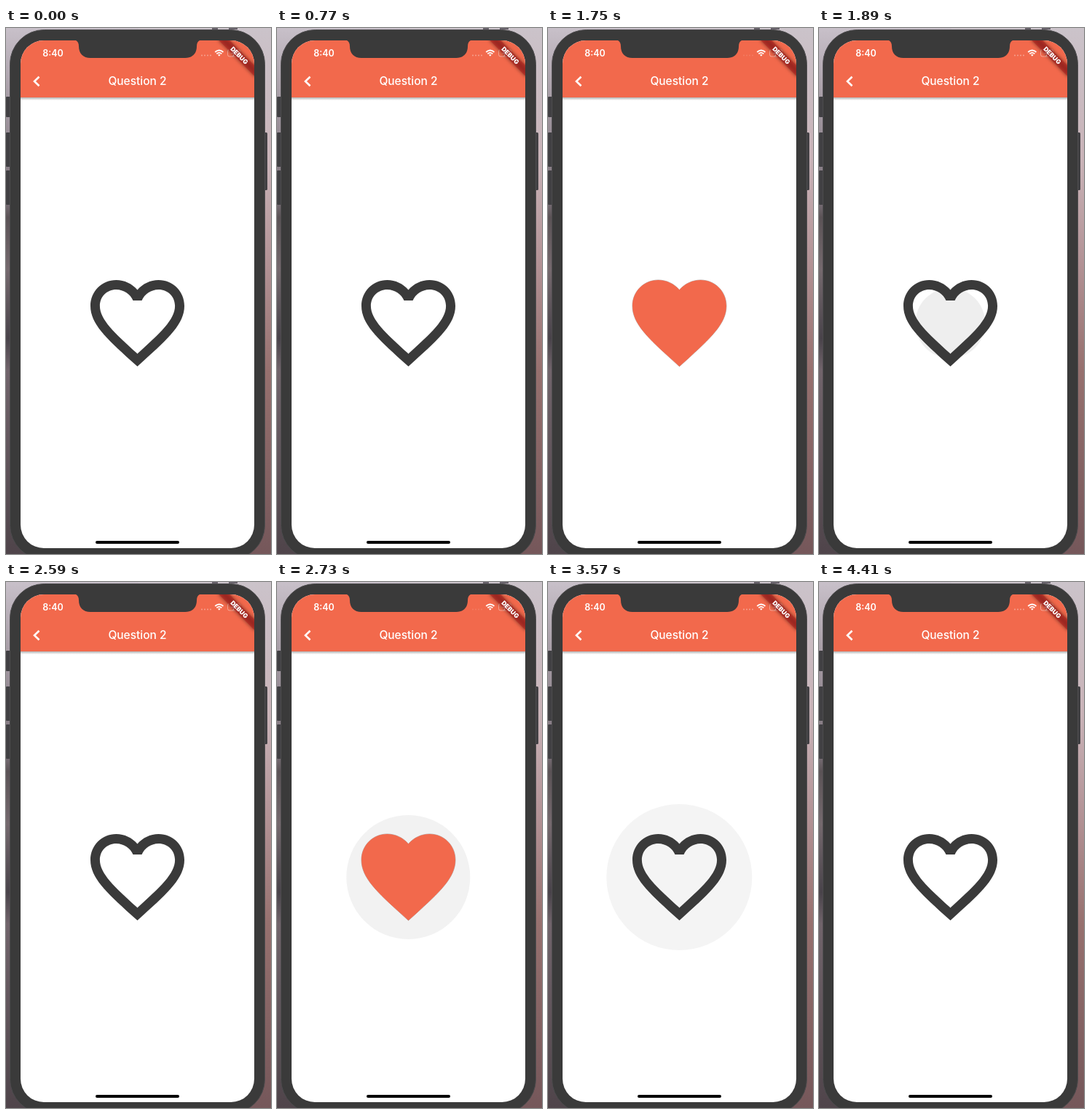
Recreate the animation shown at these times as an HTML page. Size 364x720 px, loop 4480 ms.

```html
<!DOCTYPE html>
<html lang="en">
<head>
<meta charset="utf-8">
<title>Like button</title>
<style>
  html, body { margin: 0; width: 100%; height: 100%; overflow: hidden; background: #83757b; }
  svg { display: block; width: 364px; height: 720px; }
  text { font-family: Inter, Roboto, sans-serif; fill: #fff; }
</style>
</head>
<body>
<svg viewBox="0 0 364 720">
  <defs>
    <linearGradient id="left" x2="0" y2="1">
      <stop offset="0" stop-color="#c8c0c9"/>
      <stop offset=".12" stop-color="#aaa0a9"/>
      <stop offset=".33" stop-color="#7b7078"/>
      <stop offset=".36" stop-color="#5b5356"/>
      <stop offset=".46" stop-color="#75696e"/>
      <stop offset=".59" stop-color="#49434a"/>
      <stop offset=".65" stop-color="#71646b"/>
      <stop offset="1" stop-color="#4f444a"/>
    </linearGradient>
    <linearGradient id="right" x2="0" y2="1">
      <stop offset="0" stop-color="#cbc3ca"/>
      <stop offset=".25" stop-color="#c9b3b8"/>
      <stop offset=".45" stop-color="#b29295"/>
      <stop offset=".65" stop-color="#97716f"/>
      <stop offset="1" stop-color="#75575a"/>
    </linearGradient>
    <linearGradient id="shade" x2="0" y2="1">
      <stop offset="0" stop-color="#000" stop-opacity=".3"/>
      <stop offset="1" stop-color="#000" stop-opacity="0"/>
    </linearGradient>
    <filter id="soft" x="-30%" y="-100%" width="160%" height="300%">
      <feGaussianBlur stdDeviation="2.4"/>
    </filter>
    <clipPath id="screen"><rect x="20" y="17" width="321" height="695" rx="32"/></clipPath>
  </defs>

  <!-- wallpaper -->
  <rect width="182" height="720" fill="url(#left)"/>
  <rect x="182" width="182" height="720" fill="url(#right)"/>
  <path d="M283 0h8v2h-8zM306 0h12v2h-12z" fill="#67616a"/>

  <!-- phone -->
  <g fill="#414043">
    <rect x="0" y="94" width="7" height="28" rx="1"/>
    <rect x="0" y="143" width="7" height="47" rx="1"/>
    <rect x="0" y="195" width="7" height="47" rx="1"/>
    <rect x="353" y="143" width="6" height="79" rx="1.5"/>
  </g>
  <rect x="5.5" y="2.5" width="350" height="725" rx="47" fill="#3a3a3a" stroke="#4d4c4e"/>

  <g clip-path="url(#screen)">
    <rect x="20" y="17" width="321" height="695" fill="#fff"/>
    <circle id="splash" cx="180.3" cy="404" fill="#c8c8c8"/>
    <g transform="translate(103.1 325.65) scale(6.45)">
      <path id="full" fill="#f2694c" stroke="#8f8583" stroke-width=".1" paint-order="stroke"
        d="M12 21.35l-1.45-1.32C5.4 15.36 2 12.28 2 8.5 2 5.42 4.42 3 7.5 3c1.74 0 3.41.81 4.5 2.09C13.09 3.81 14.76 3 16.5 3 19.58 3 22 5.42 22 8.5c0 3.78-3.4 6.86-8.55 11.54z"/>
      <path id="empty" fill="#3a3a3a"
        d="M16.5 3c-1.74 0-3.41.81-4.5 2.09C10.91 3.81 9.24 3 7.5 3 4.42 3 2 5.42 2 8.5c0 3.78 3.4 6.86 8.55 11.54L12 21.35l1.45-1.32C18.6 15.36 22 12.28 22 8.5 22 5.42 19.58 3 16.5 3zm-4.4 15.55l-.1.1-.1-.1C7.14 14.24 4 11.39 4 8.5 4 6.5 5.5 5 7.5 5c1.54 0 3.04.99 3.57 2.36h1.87C13.46 5.99 14.96 5 16.5 5c2 0 3.5 1.5 3.5 3.5 0 2.89-3.14 5.74-7.9 10.05z"/>
    </g>

    <!-- app bar -->
    <rect x="20" y="95" width="321" height="4" fill="url(#shade)"/>
    <rect x="20" y="17" width="321" height="78" fill="#f2694c"/>
    <path d="M91 16c6 0 9 3 9 9 0 10 6 16 16 16h130c10 0 16-6 16-16 0-6 3-9 9-9z" fill="#3a3a3a"/>
    <text x="50.3" y="39" font-size="12.5" font-weight="600">8:40</text>
    <text x="180.5" y="78" font-size="15.5" font-weight="500" text-anchor="middle">Question 2</text>
    <path d="M45.5 66.8L39 73l6.500 6.200" fill="none" stroke="#fff" stroke-width="2.6"/>

    <!-- status icons -->
    <g id="dots" fill="#fff">
      <circle cx="269" cy="37.500" r="1"/><circle cx="273" cy="37.500" r="1"/>
      <circle cx="277" cy="37.500" r="1"/><circle cx="281" cy="37.500" r="1"/>
    </g>
    <g fill="none" stroke="#fff" stroke-width="1.8">
      <path d="M287.200 33q5.600-5 11.200 0M289.300 35.400q3.500-3 7 0"/>
      <path d="M291 36.800q1.800-1.400 3.600 0l-1.800 2z" fill="#fff" stroke="none"/>
    </g>
    <rect x="304.500" y="29.500" width="17" height="9.500" rx="2.500" fill="none" stroke="#fff" stroke-opacity=".4"/>
    <path d="M313.500 29.500l-4 5.500h3l-1 4.500 4.200-6h-3z" fill="#fff"/>

    <!-- corner ribbon -->
    <g transform="translate(341 17) rotate(45)">
      <rect x="-36" y="24" width="72" height="10.300" opacity=".5" filter="url(#soft)"/>
      <rect x="-36" y="24" width="72" height="10.300" fill="#b71c1c" opacity=".55"/>
      <text y="32.200" font-size="8.600" font-weight="900" text-anchor="middle">DEBUG</text>
    </g>
    <rect x="123" y="702" width="115" height="4" rx="2"/>
  </g>
</svg>
<script>
  const LOOP = 4480, STEP = 70, FADE = 200;
  const taps = [1022, 1842, 2645, 3470];
  const [splash, full, empty, dots] =
    ["splash", "full", "empty", "dots"].map(id => document.getElementById(id));

  function draw(now) {
    const t = Math.floor(now % LOOP / STEP) * STEP;
    const past = taps.filter(tap => tap <= t);
    const liked = past.length % 2 === 1;
    full.style.display = liked ? "" : "none";
    empty.style.display = liked ? "none" : "";
    dots.setAttribute("opacity", liked ? 0.12 : 0.38);

    // The splash grows one pixel per millisecond while it fades.
    const age = past.length ? t - past[past.length - 1] : FADE;
    splash.setAttribute("r", Math.min(age, FADE));
    splash.setAttribute("opacity", 0.4 * Math.max(0, 1 - age / FADE));
  }

  const start = performance.now();
  function tick() {
    draw(performance.now() - start);
    requestAnimationFrame(tick);
  }
  tick();
</script>
</body>
</html>
```
